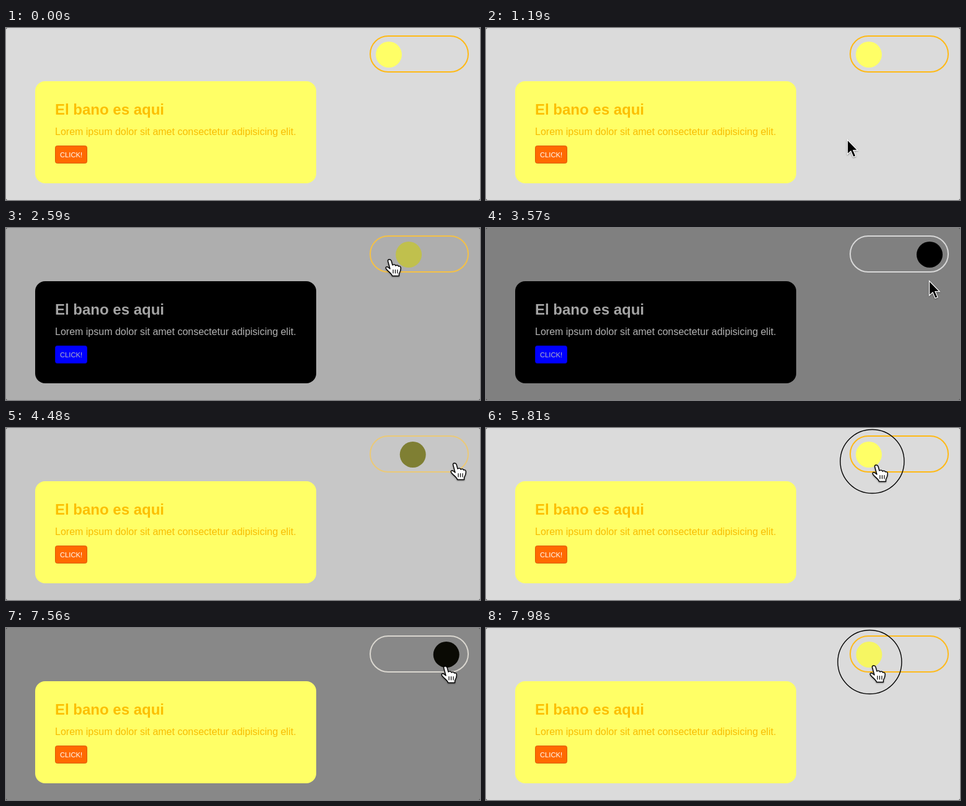
Animation of 764 by 278 pixels, one loop 8 s. Source, as an HTML page:

```html
<!DOCTYPE html>
<html lang="en">
<head>
<meta charset="utf-8">
<title>Theme toggle</title>
<style>
  html, body { margin: 0; width: 100%; height: 100%; overflow: hidden; background: #444; }
  svg { display: block; width: 100%; height: 100%; }
  text { font-family: "Liberation Sans", Arial, sans-serif; }
</style>
</head>
<body>
<svg viewBox="0 0 764 278">
  <rect id="page" width="764" height="278" rx="3"/>
  <rect id="card" x="47" y="86" width="453" height="165" rx="16"/>
  <text id="title" x="79" y="140" font-size="24" font-weight="700">El bano es aqui</text>
  <text id="body" x="79" y="173" font-size="16">Lorem ipsum dolor sit amet consectetur adipisicing elit.</text>
  <rect id="button" x="79.5" y="190.5" width="51" height="28" rx="3"/>
  <text id="label" x="87" y="209" font-size="11.2">CLICK!</text>
  <rect id="pill" x="587" y="13" width="158" height="58" rx="29" fill="none" stroke-width="2"/>
  <circle id="knob" cy="43" r="21"/>
  <circle id="ring" r="51.5" fill="none" stroke="#000" stroke-width="1.4"/>
  <g id="cursor" style="filter: drop-shadow(0 1px 1px rgba(0,0,0,.4))">
    <path id="arrow" d="M.5 .5V24L6 19L10 28.5L14 26.8L10 17.6H17Z" fill="#000" stroke="#fff" stroke-width="1.3"/>
    <g id="hand" stroke="#000" stroke-linejoin="round" stroke-linecap="round">
      <path d="M-2.5 2C-2.5-1 2-1 3 2L5 9C7 7.5 9.5 8 10 10C12 8.5 14.5 9.5 14.5 11C16.5 10 18.5 11.5 18.3 14C18.3 18 17 20 15.5 23V26.5H4.5C4 23-1 20-4 16.5C-8 12.5-4.5 10.5-1.5 13L1 15Z" fill="#fff" stroke-width="1.4"/>
      <path d="M6 16.5V22M9.5 16.5V22M13 16.5V22" fill="none" stroke-width="1.2"/>
    </g>
  </g>
</svg>
<script>
const LOOP = 8000, STEP = 70;
const el = {};
document.querySelectorAll('[id]').forEach(e => el[e.id] = e);

const light = {
  page: [219, 219, 219], pill: [255, 185, 21], knob: [255, 255, 102], x: 617,
  card: '#ffff66', title: '#fcbf00', body: '#f8bc00',
  button: '#ff6a00', edge: '#d95a00', label: '#fff'
};
const dark = {
  page: [128, 128, 128], pill: [216, 216, 216], knob: [0, 0, 0], x: 715,
  card: '#000', title: '#a4a4a4', body: '#b2b2b2',
  button: '#0000ff', edge: '#0000d0', label: '#b8b8c8'
};

const toggles = [2483, 4305, 5915, 7525];
const presses = [[2310, 2520], [4130, 4340], [5810, 5950], [7280, 7560], [7980, 8000]];

// time, x, y of the pointer tip
const path = [
  [490, 742, 110], [840, 644, 181], [910, 644, 181], [1190, 582, 180],
  [1330, 582, 180], [1750, 596, 88], [1820, 612, 51], [1960, 612, 51],
  [2170, 618, 51], [2660, 618, 51], [3290, 690, 72], [3570, 714, 85],
  [3780, 714, 85], [4130, 723, 57], [4760, 723, 57], [5110, 710, 61],
  [5600, 629, 60], [5880, 629, 60], [6510, 631, 62], [6720, 631, 62],
  [7140, 708, 62], [7560, 708, 62], [7910, 625, 61]
];

const mix = (a, b, k) => a + (b - a) * k;
const mixRgb = (a, b, k) => `rgb(${a.map((v, i) => Math.round(mix(v, b[i], k)))})`;
const smooth = k => k * k * (3 - 2 * k);

// cubic-bezier(.25, .1, .25, 1)
function ease(p) {
  if (p >= 1) return 1;
  const curve = (s, a, b) => 3 * s * (1 - s) ** 2 * a + 3 * s * s * (1 - s) * b + s ** 3;
  let lo = 0, hi = 1;
  for (let i = 0; i < 20; i++) {
    const mid = (lo + hi) / 2;
    if (curve(mid, .25, .25) < p) lo = mid; else hi = mid;
  }
  return curve(lo, .1, 1);
}

function pointer(t) {
  const i = path.findIndex(p => p[0] > t);
  if (i < 0) return path[path.length - 1].slice(1);
  if (i === 0) return path[0].slice(1);
  const [t0, x0, y0] = path[i - 1], [t1, x1, y1] = path[i];
  const k = smooth((t - t0) / (t1 - t0));
  return [mix(x0, x1, k), mix(y0, y1, k)];
}

function show(node, on) {
  node.setAttribute('visibility', on ? 'visible' : 'hidden');
}

function drawTheme(t) {
  const past = toggles.filter(s => s <= t);
  const isDark = past.length % 2 === 1;
  const from = isDark ? light : dark, to = isDark ? dark : light;
  const since = past.length ? t - past[past.length - 1] : LOOP;
  const at = ms => ease(since / ms);

  el.page.setAttribute('fill', mixRgb(from.page, to.page, at(365)));
  el.pill.setAttribute('stroke', mixRgb(from.pill, to.pill, at(600)));
  el.knob.setAttribute('fill', mixRgb(from.knob, to.knob, at(600)));
  el.knob.setAttribute('cx', mix(from.x, to.x, at(500)));
  for (const id of ['card', 'title', 'body', 'button', 'label']) el[id].setAttribute('fill', to[id]);
  el.button.setAttribute('stroke', to.edge);
}

function drawPointer(t) {
  const [x, y] = pointer(t);
  const visible = t >= path[0][0];
  const over = x > 586 && x < 746 && y > 12 && y < 72;
  el.cursor.setAttribute('transform', `translate(${x} ${y})`);
  show(el.arrow, visible && !over);
  show(el.hand, visible && over);
  el.ring.setAttribute('cx', x - 6.5);
  el.ring.setAttribute('cy', y - 6);
  show(el.ring, presses.some(([a, b]) => t >= a && t < b));
}

const start = performance.now();
function tick() {
  const now = (performance.now() - start) % LOOP;
  const t = Math.floor(now / STEP) * STEP;
  drawTheme(t);
  drawPointer(t);
  requestAnimationFrame(tick);
}
tick();
</script>
</body>
</html>
```
